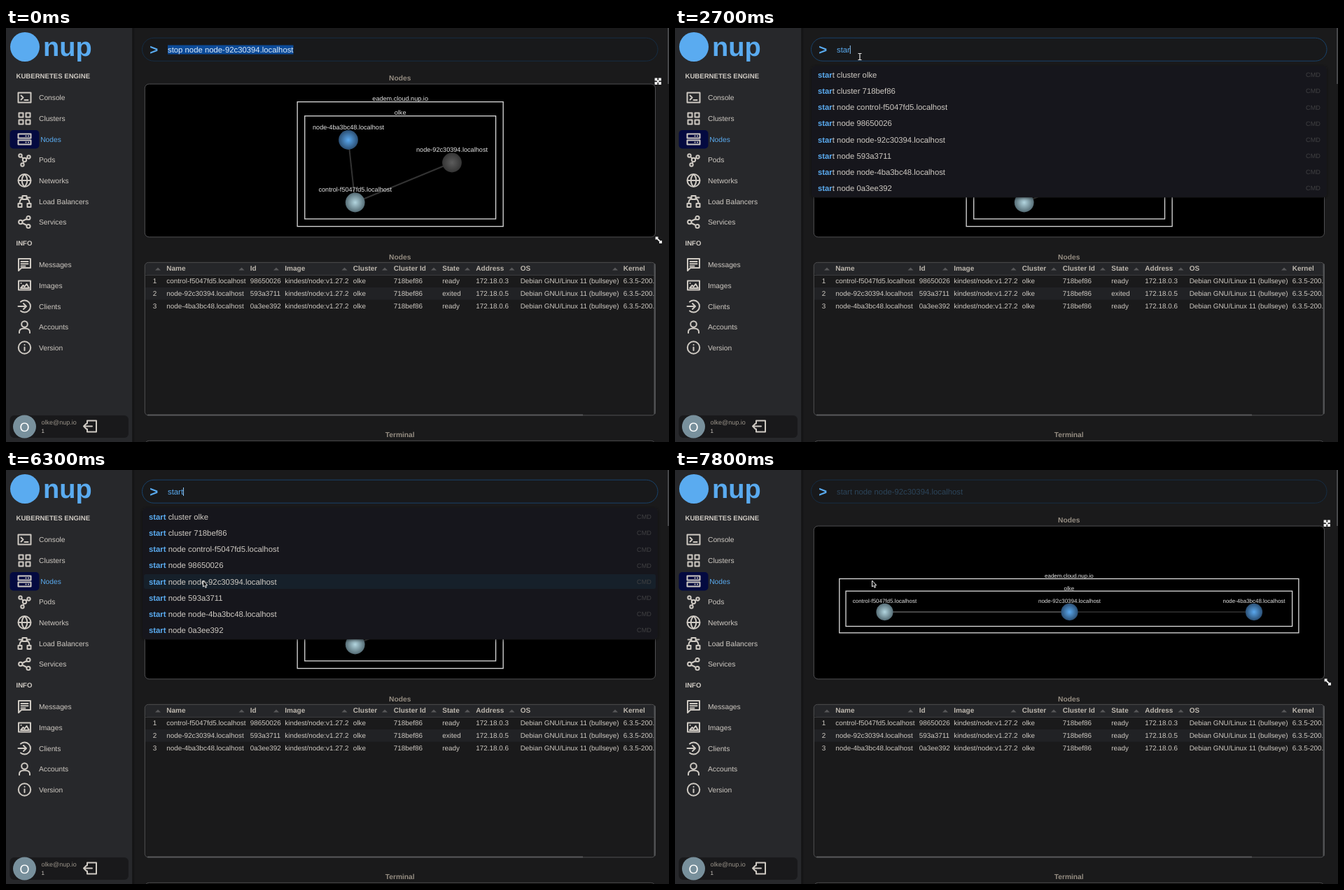
Write an HTML page that moves like this. It is 947x592 px and loops after 8000 ms.

```html
<!DOCTYPE html>
<html lang="en">
<head>
<meta charset="utf-8">
<title>Node console</title>
<style>
  html, body { margin: 0; width: 100%; height: 100%; overflow: hidden; background: #1a1a1b; }
  svg { display: block; }
  text { font-family: "Liberation Sans", Arial, sans-serif; fill: #cfcac3; text-rendering: geometricPrecision; }
  .bold { font-weight: 700; }
  .mid { text-anchor: middle; }
  .icon { fill: none; stroke: #cfcac3; stroke-width: 2; stroke-linecap: round; stroke-linejoin: round; }
  .panel { stroke: #505052; stroke-width: 1; }
  .title { fill: #958d82; font-weight: 700; }
  .hit { fill: #5aabf0; font-weight: 700; }
  .tag { fill: #414143; text-anchor: end; }
  .group { fill: none; stroke: #dcdcdc; stroke-width: 1.3; }
  .edge { stroke: #fff; stroke-opacity: .2; }
  #graph text { fill: #e4e4e4; text-anchor: middle; }
  #tools path { fill: none; stroke: #f2f2f2; stroke-width: 1.8; }
</style>
</head>
<body>
<svg width="947" height="592" viewBox="0 0 947 592">
  <defs>
    <radialGradient id="blue"><stop offset="0" stop-color="#5aa8ee"/><stop offset="1" stop-color="#2b4f74"/></radialGradient>
    <radialGradient id="pale"><stop offset="0" stop-color="#b2d5df"/><stop offset="1" stop-color="#566d76"/></radialGradient>
    <radialGradient id="grey"><stop offset="0" stop-color="#5c5c5c"/><stop offset="1" stop-color="#353535"/></radialGradient>
    <linearGradient id="shade"><stop offset="0" stop-color="#111112"/><stop offset="1" stop-color="#1a1a1b"/></linearGradient>
    <clipPath id="tableClip"><rect x="198" y="335" width="728" height="219"/></clipPath>
    <filter id="soft" x="-5%" y="-10%" width="110%" height="120%"><feDropShadow dx="0" dy="1" stdDeviation="2" flood-opacity=".5"/></filter>
  </defs>
  <rect width="947" height="592" fill="#1a1a1b"/>
  <rect width="180.500" height="592" fill="#27282b"/>
  <rect x="180.500" width="4" height="592" fill="url(#shade)"/>
  <rect x="945" width="2" height="80" fill="#47484a"/>
  <g id="sidebar"></g>
  <rect class="panel" x="198.300" y="80.100" width="729.200" height="218.800" rx="6" fill="#000"/>
  <g id="graph"></g>
  <g id="table"></g>
  <rect class="panel" x="198.300" y="590.300" width="729.200" height="20" rx="6" fill="#000"/>
  <g id="titles"></g>
  <g id="tools">
    <path d="M928 73l6.500 6.500M934.500 73l-6.500 6.500M927.500 75.500v-3h3M932 72.500h3v3M935 77v3h-3M930.500 80h-3v-3"/>
    <path d="M929 300l6.500 6.500M928.500 302.500v-3h3M936 304v3h-3"/>
  </g>
  <rect id="pill" x="194.500" y="14.200" width="736.500" height="33" rx="16.500" fill="#18191b"/>
  <text class="bold" x="205.200" y="37.700" font-size="20.500" style="fill:#5aabf0">&gt;</text>
  <g id="prompt"></g>
  <g id="menu"></g>
  <g id="pointer"></g>
</svg>
<script>
const $ = id => document.getElementById(id);
const text = (x, y, size, str, cls = '', style = '') =>
  `<text x="${x}" y="${y + size * 0.355}" font-size="${size}" class="${cls}" style="${style}">${str}</text>`;
const rect = (x, y, w, h, fill, rx = 0, cls = '') =>
  `<rect x="${x}" y="${y}" width="${w}" height="${h}" rx="${rx}" fill="${fill}" class="${cls}"/>`;
const circle = (x, y, r, fill) => `<circle cx="${x}" cy="${y}" r="${r}" fill="${fill}"/>`;
const ring = (x, y, r) => `M${x - r} ${y}a${r} ${r} 0 1 0 ${2 * r} 0a${r} ${r} 0 1 0 ${-2 * r} 0`;

const BLUE = '#5aabf0';
const USER = 'olke', HOST = 'nup.io', CLUSTER = '718bef86';
const NODES = [
  ['control-f5047fd5.localhost', '98650026', 'ready', '172.18.0.3'],
  ['node-92c30394.localhost', '593a3711', 'exited', '172.18.0.5'],
  ['node-4ba3bc48.localhost', '0a3ee392', 'ready', '172.18.0.6']
];

// Sidebar: label, centre y, icon path around 0,0
const MENU = [
  ['Console', 99.5, 'M-9 -7h18v14h-18zM-5 -3l3 3l-3 3M0 3.500h5'],
  ['Clusters', 129.5, 'M-8 -8h6v6h-6zM2 -8h6v6h-6zM-8 2h6v6h-6zM2 2h6v6h-6z'],
  ['Nodes', 159, 'M-9 -7.500h18v6h-18zM-9 1.500h18v6h-18zM2 -4.500h.1M5.500 -4.500h.1M2 4.500h.1M5.500 4.500h.1'],
  ['Pods', 188.5, ring(0, 0, 2.7) + ring(-6, -6, 2.2) + ring(6, -4, 2.2) + ring(-3, 7, 2.2) + 'M-4.500 -4.500l2.500 2.500M4 -3l-1.500 1M-2 5l1 -2.500'],
  ['Networks', 218, ring(0, 0, 9) + 'M-9 0h18M0 -9c-5 5 -5 13 0 18c5 -5 5 -13 0 -18'],
  ['Load Balancers', 248, 'M-3 -8h6v5h-6zM-9 3h5v5h-5zM4 3h5v5h-5zM-3 -5.500h-5M3 -5.500h5M-3 -4c-3 1 -4 4 -4 7M3 -4c3 1 4 4 4 7'],
  ['Services', 277.5, ring(-5.7, 0, 2.7) + ring(5.5, -6, 2.6) + ring(5.5, 6, 2.6) + 'M-3 -1.500l6 -3M-3 1.500l6 3'],
  ['Messages', 338.5, 'M-8.500 -8.500h17v13h-13l-4 4zM-5 -4.500h10M-5 -1.200h10M-5 2h6'],
  ['Images', 368, 'M-8.500 -6.500h17v13h-17zM-5.500 4l3.500 -4l2 2l3 -4l3.500 6zM-5 -3h.1'],
  ['Clients', 398, 'M-5.500 -6.500a8.500 8.500 0 1 1 0 13M-9 0h11M-1.500 -4l4 4l-4 4'],
  ['Accounts', 427.5, ring(0, -4, 4.3) + 'M-7.500 8.500v-1.500c0 -4 3 -5 7.500 -5s7.500 1 7.500 5v1.500'],
  ['Version', 457, ring(0, 0, 8.7) + 'M0 -.500v4.500M0 -4h.1']
];
const icon = (x, y, d) => `<path class="icon" transform="translate(${x} ${y})" d="${d}"/>`;

function drawSidebar() {
  let out = circle(27, 27, 21, BLUE) + `<text class="bold" x="53" y="40" font-size="38" style="fill:${BLUE}">nup</text>`;
  out += text(14.5, 69, 9.6, 'KUBERNETES ENGINE', 'bold') + text(14.5, 308, 9.6, 'INFO', 'bold');
  for (const [label, y, d] of MENU) {
    const active = label === 'Nodes';
    if (active) out += rect(5.5, 146, 42, 26.5, '#040a40', 5);
    out += icon(26.5, y, d) + text(active ? 49.2 : 47, y, 10.24, label, '', active ? `fill:${BLUE}` : '');
  }
  out += rect(5.5, 554, 169.5, 32, '#19191b', 6) + circle(26.5, 570, 16.5, '#78909c')
    + text(26.5, 570.5, 18, USER[0].toUpperCase(), 'mid', 'fill:#fff')
    + text(50.5, 564, 9, `${USER}@${HOST}`, '', 'fill:#9b948a') + text(50.5, 576.5, 8, '1')
    + icon(120, 569.5, 'M-4 -4v-4h13v16h-13v-4M-9 0h12M-5 -4l-4 4l4 4');
  $('sidebar').innerHTML = out;
}

function drawTable(state) {
  const cols = [229.3, 348.7, 398.3, 495.8, 553.7, 623.3, 671.3, 734.7, 881.7];
  const heads = ['Name', 'Id', 'Image', 'Cluster', 'Cluster Id', 'State', 'Address', 'OS', 'Kernel'];
  let out = rect(198.3, 335.3, 729.2, 218.5, '#1a1a1b', 5)
    + rect(199, 336, 727, 17, '#252629', 4) + rect(199, 371, 727, 17.6, '#212225')
    + rect(199, 353, 727, 1, '#3a3b3d');
  heads.forEach((h, i) => out += text(cols[i], 343.6, 10, h, 'bold', 'fill:#bdb7ae'));
  for (const x of [217, 336.5, 386, 483.5, 541, 611, 659, 722.5, 870])
    out += `<path d="M${x - 4} 346.500l4 -4l4 4z" fill="#58585a"/>`;
  NODES.forEach(([name, id, st, ip], i) => {
    const y = 361.6 + 17.8 * i;
    out += text(212.5, y, 9.9, i + 1, 'mid');
    [name, id, 'kindest/node:v1.27.2', USER, CLUSTER, i === 1 ? state : st, ip,
      'Debian GNU/Linux 11 (bullseye)', '6.3.5-200.fc38'].forEach((v, c) => out += text(cols[c], y, 9.9, v));
  });
  $('table').innerHTML = `<g clip-path="url(#tableClip)">${out}</g>`
    + rect(198.3, 335.3, 729.2, 218.5, 'none', 5, 'panel')
    + rect(925.5, 337, 2, 215, '#515254') + rect(202, 552.5, 622, 1.8, '#5a5b5d');
}

// Node order: control, 92c, 4ba. Group boxes follow the nodes.
function drawGraph(pos, s, awake) {
  const font = 9.14 * s, widths = [11.45, 11.173, 11.173];
  const xs = pos.map(p => p[0]), ys = pos.map(p => p[1]);
  const box = {
    l: Math.min(...xs.map((x, i) => x - widths[i] * font / 2)) - 11.2 * s,
    r: Math.max(...xs.map((x, i) => x + widths[i] * font / 2)) + 11.5 * s,
    t: Math.min(...ys) - 34.2 * s, b: Math.max(...ys) + 23.5 * s
  };
  const frame = (l, t, r, b, label) => rect(l, t, r - l, b - t, 'none', 0, 'group')
    + text((l + r) / 2, t - 4.9 * s, font, label);
  const [a, b, c] = pos;
  let out = frame(box.l - 10.6 * s, box.t - 20.2 * s, box.r + 10.6 * s, box.b + 10.7 * s, `eadem.cloud.${HOST}`)
    + frame(box.l, box.t, box.r, box.b, USER);
  for (const p of [b, c])
    out += `<line class="edge" x1="${a[0]}" y1="${a[1]}" x2="${p[0]}" y2="${p[1]}" stroke-width="${2 * s}"/>`;
  const fills = ['pale', awake ? 'blue' : 'grey', 'blue'];
  pos.forEach(([x, y], i) => out += circle(x, y, 13.9 * s, `url(#${fills[i]})`)
    + text(x, y - 18.5 * s, font, NODES[i][0]));
  $('graph').innerHTML = out;
}

const row = (...ys) => [299.5, 563.5, 827].map((x, i) => [x, ys[i]]);
const LAYOUTS = [
  [0, [[498.7, 249.5], [637, 192.5], [489, 160]], 1],
  [7300, row(222, 203, 183), 0.873],
  [7500, row(203, 203, 203), 0.873],
  [7700, row(245, 202, 160), 0.873],
  [7800, row(203, 203, 203), 0.873]
];

// Last entry whose start has passed
const at = (list, t) => list.filter(e => e[0] <= t).pop();

const COMMANDS = ['version', 'get cluster --all', 'get nodes --all', 'get networks --all', 'get images', 'delete clusters --all'];
for (const c of [USER, CLUSTER]) for (const v of ['start cluster', 'stop cluster', 'delete cluster', 'get clusters']) COMMANDS.push(`${v} ${c}`);
for (const n of NODES) for (const key of n.slice(0, 2)) for (const v of ['start', 'stop']) COMMANDS.push(`${v} node ${key}`);

const FULL = 'node node-92c30394.localhost';
const TYPED = [[0, 'stop ' + FULL], [1300, ''], [2100, 's'], [2300, 'st'], [2500, 'sta'], [2700, 'star'], [2800, 'start'], [6500, 'start ' + FULL]];
const QUERY = [[0, ''], [2100, 's'], [2400, 'st'], [2600, 'sta'], [2700, 'star'], [2900, 'start'], [6500, '']];
const CARET = [[0, 0], [2100, 1], [3400, 0], [3900, 1], [4500, 0], [5200, 1], [5700, 0], [6300, 1], [6500, 0]];
const FADE = [[0, 1], [6500, 0.8], [6600, 0.55], [6700, 0.39], [6800, 0.33], [6900, 0.29]];
const STATES = [[0, 'exited'], [7200, 'started'], [7500, 'ready']];
const CARET_X = { s: 5.65, st: 8.8, sta: 15.1, star: 18.8, start: 22 };

function drawPrompt(t) {
  const focus = t >= 1200 && t < 6500, str = at(TYPED, t)[1], selected = t < 1300;
  $('pill').setAttribute('stroke', focus ? '#18426a' : '#162d44');
  let out = selected ? rect(231, 24.5, 179.5, 13, '#0b4a98') : '';
  out += text(231, 31, 11.33, str, '', `fill:${selected ? '#dcebfa' : BLUE};opacity:${at(FADE, t)[1]}`);
  if (at(CARET, t)[1]) out += rect(231 + (CARET_X[str] || 0), 25, 1, 12, '#8cc4f4');
  $('prompt').innerHTML = out;
  $('tools').style.display = focus ? 'none' : '';
}

const ROW = 23.1;
function drawMenu(query, mouse) {
  if (!query) return $('menu').innerHTML = '';
  const items = COMMANDS.filter(c => c.includes(query)).slice(0, 10);
  let out = `<g filter="url(#soft)">${rect(195, 54, 736, 3.5 + ROW * items.length, '#19191b', 5)}</g>`;
  items.forEach((cmd, i) => {
    const y = 67.1 + ROW * i, k = cmd.indexOf(query);
    if (Math.abs(mouse[1] - y) < ROW / 2) out += rect(197, y - 10.5, 731, 21, '#16202a', 3);
    out += text(204, y, 11.33, `${cmd.slice(0, k)}<tspan class="hit">${query}</tspan>${cmd.slice(k + query.length)}`)
      + text(921.8, y, 9.1, 'CMD', 'tag');
  });
  $('menu').innerHTML = out;
}

const PATH = [[0, 264, 41], [3600, 264, 41], [3900, 270, 100], [4200, 280, 235], [4300, 281, 245], [4500, 283, 205], [4700, 281.5, 158], [8000, 281.5, 158]];
function mouseAt(t) {
  const i = PATH.findIndex(p => p[0] > t), [t0, x0, y0] = PATH[i - 1], [t1, x1, y1] = PATH[i];
  const k = (t - t0) / (t1 - t0);
  return [x0 + (x1 - x0) * k, y0 + (y1 - y0) * k];
}
const SHAPES = {
  beam: '<path d="M-2.500 -4.500h2l.5 .5l.5 -.500h2M0 -4v8M-2.500 4.500h2l.5 -.500l.5 .500h2" fill="none" stroke="#e8e8e8" stroke-width="1.2"/>',
  arrow: '<path d="M0 0v9l2 -1.700l1.500 3l1.500 -.700l-1.400 -2.800h2.700z" fill="#111" stroke="#f0f0f0" stroke-width="1"/>',
  hand: '<path d="M-1 0v5l-1.800 -1l-.5 1l2.500 3.500h5v-5l-3.700 -1v-2.500z" fill="#222" stroke="#e8e8e8" stroke-width="1"/>'
};
function drawPointer(t, [x, y]) {
  const kind = y < 48 ? 'beam' : t < 5500 && y > 56 && y < 243 ? 'hand' : 'arrow';
  $('pointer').innerHTML = t < 1200 ? '' : `<g transform="translate(${x} ${y})">${SHAPES[kind]}</g>`;
}

function draw(t) {
  const mouse = mouseAt(t), [, pos, scale] = at(LAYOUTS, t);
  drawGraph(pos, scale, t >= 7200);
  drawTable(at(STATES, t)[1]);
  drawPrompt(t);
  drawMenu(at(QUERY, t)[1], mouse);
  drawPointer(t, mouse);
}

drawSidebar();
$('titles').innerHTML = [['Nodes', 71.7], ['Nodes', 327.2], ['Terminal', 581.7]]
  .map(([s, y]) => text(562.7, y, 10.24, s, 'title mid')).join('');

const start = performance.now();
let last = -1;
function tick() {
  const t = Math.floor((performance.now() - start) % 8000 / 100) * 100;
  if (t !== last) draw(last = t);
  requestAnimationFrame(tick);
}
tick();
</script>
</body>
</html>
```
